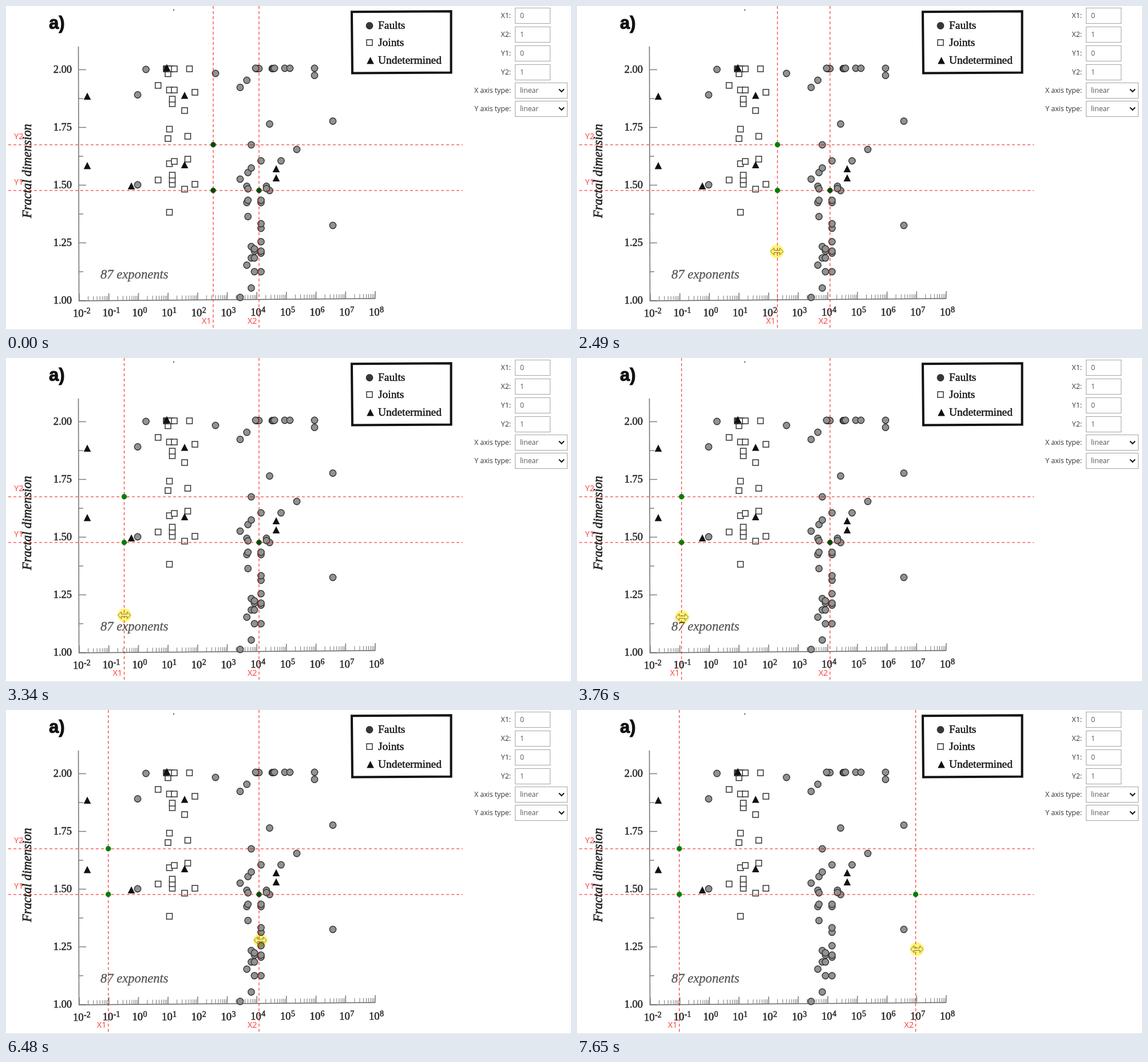
Write an HTML page with a canvas that moves like this. It is 987 px wide and 567 px high and loops after 8000 ms.

```html
<!DOCTYPE html>
<html lang="en">
<head>
<meta charset="utf-8">
<title>Axis calibration</title>
<style>
html, body { margin: 0; width: 100%; height: 100%; overflow: hidden; background: #fff; }
canvas { display: block; }
</style>
</head>
<body>
<canvas id="stage" width="987" height="567"></canvas>
<script>
const canvas = document.getElementById('stage');
const ctx = canvas.getContext('2d');
const LOOP = 8000, STEP = 69, SLACK = 10;
const SERIF = '"Liberation Serif", serif';
const SANS = '"Open Sans", sans-serif';
const Y1 = 322.8, Y2 = 242.8;

// A gesture starts, then advances in equal holds
const PRESS1 = 2230, DRAG1 = 2420, RELEASE1 = 4830, LEAVE1 = 5040, PRESS2 = 6350, DRAG2 = 6680;
const gestures = [0, 590, PRESS1, DRAG1, RELEASE1, LEAVE1, PRESS2, DRAG2];

function held(t) {
  const start = gestures.filter(s => s <= t + SLACK).pop();
  return start + Math.floor((t + SLACK - start) / STEP) * STEP;
}

// Monotone cubic curve through [time, value] keys
function curve(keys, t) {
  const last = keys.length - 1;
  if (t <= keys[0][0]) return keys[0][1];
  if (t >= keys[last][0]) return keys[last][1];
  const slope = i => (keys[i + 1][1] - keys[i][1]) / (keys[i + 1][0] - keys[i][0]);
  const tangent = i => {
    if (i === 0 || i === last) return 0;
    const a = slope(i - 1), b = slope(i);
    return a * b > 0 ? 2 * a * b / (a + b) : 0;
  };
  const i = keys.findIndex(k => k[0] > t) - 1;
  const span = keys[i + 1][0] - keys[i][0];
  const u = (t - keys[i][0]) / span, v = 1 - u;
  return v * v * (1 + 2 * u) * keys[i][1] + u * u * (3 - 2 * u) * keys[i + 1][1]
    + span * u * v * (v * tangent(i) - u * tangent(i + 1));
}

const guide1 = t => curve(
  [[2350, 362], [2489, 350.2], [3179, 217], [3317, 206.5], [3731, 182.6], [4007, 178.7]], t);
const guide2 = t => curve([[6611, 442], [7025, 510.6], [7439, 578], [7646, 591.6]], t);

// While dragging, the pointer runs slightly ahead of its guide on a straight slope
function pointerAt(t) {
  const lead = 20;
  if (t >= PRESS1 && t < LEAVE1) {
    const x = guide1(t + lead) + 1.5;
    return [x, 454 - 0.144 * (x - 180)];
  }
  if (t >= PRESS2) {
    const x = guide2(t + lead) + 2.3;
    return [x, 403 + 0.104 * (x - 444)];
  }
  if (t < PRESS1) {
    return [curve([[590, 932], [1349, 388], [1832, 363.5]], t),
      curve([[590, 547], [1349, 422], [1832, 427.5]], t)];
  }
  return [curve([[4971, 180], [5454, 393], [5868, 453], [6090, 444]], t),
    curve([[4971, 454], [5454, 378], [5868, 401], [6090, 403]], t)];
}

function path(points, close) {
  ctx.beginPath();
  for (let i = 0; i < points.length; i += 2) ctx.lineTo(points[i], points[i + 1]);
  if (close) ctx.closePath();
}

function line(x1, y1, x2, y2) {
  path([x1, y1, x2, y2]);
  ctx.stroke();
}

function disc(x, y, r) {
  ctx.beginPath();
  ctx.arc(x, y, r, 0, Math.PI * 2);
  ctx.fill();
}

function pen(color, width) {
  ctx.strokeStyle = color;
  ctx.lineWidth = width;
}

function text(str, x, y, font, color, align = 'left', bold = 0) {
  ctx.font = font;
  ctx.fillStyle = color;
  ctx.textAlign = align;
  ctx.fillText(str, x, y);
  if (bold) {
    pen(color, bold);
    ctx.strokeText(str, x, y);
  }
}

function faultMark(x, y, fill = '#929292') {
  ctx.fillStyle = fill;
  disc(x, y, 5.7);
  pen('#333', 1.4);
  ctx.stroke();
}

function jointMark(x, y) {
  ctx.fillStyle = '#fff';
  ctx.fillRect(x - 5, y - 5, 10, 10);
  pen('#333', 1.5);
  ctx.strokeRect(x - 5, y - 5, 10, 10);
}

function triangleMark(x, y) {
  ctx.fillStyle = '#111';
  path([x, y - 6.5, x + 6.3, y + 6, x - 6.3, y + 6], true);
  ctx.fill();
}

const column = (mark, x, ...ys) => ys.forEach(y => mark(x, y));
const row = (mark, y, ...xs) => xs.forEach(x => mark(x, y));

// Overlapping marks that read as one dark blot
function blot(mark, from, to, y) {
  for (let x = from; x <= to; x++) mark(x, y);
}

function drawFaults() {
  const mark = (x, y) => faultMark(x, y);
  blot(mark, 437, 442, 109.5);
  blot(mark, 465, 467, 109.5);
  row(mark, 109, 436, 469, 487, 496, 539);
  column(mark, 230, 155.5, 313);
  column(mark, 409, 142.5, 303, 510);
  column(mark, 420.7, 130, 315.5, 344, 453.5);
  column(mark, 422.7, 291.5, 320, 340, 368.5);
  column(mark, 428.5, 243, 283.5, 421, 441, 493.5);
  column(mark, 434, 429, 425, 441, 465);
  column(mark, 445.5, 271, 344, 340, 389, 381, 412.5, 432.5, 429, 465);
  column(mark, 460.5, 206.5, 323);
  column(mark, 455, 315.5, 319.5);
  column(mark, 571, 201.5, 384);
  row(mark, 271, 480.5);
  mark(244.5, 111);
  mark(366, 118);
  mark(539, 121.5);
  mark(508, 251);
}

function drawJoints() {
  const mark = jointMark;
  column(mark, 283, 118.5, 232);
  blot(mark, 280, 287, 110);
  row(mark, 110, 294, 320.5);
  column(mark, 285.5, 147, 215.5, 276, 361);
  column(mark, 290.5, 171, 163, 312, 304, 296);
  column(mark, 294, 147, 272);
  column(mark, 265.7, 139, 304.5);
  column(mark, 312, 183, 320.5);
  column(mark, 317.5, 228, 268);
  column(mark, 330, 151, 312);
}

function drawUndetermined() {
  column(triangleMark, 142, 158, 279.5);
  column(triangleMark, 312, 156.5, 278);
  column(triangleMark, 472, 285, 301);
  triangleMark(281, 108);
  triangleMark(219, 315);
}

function drawAxes() {
  pen('#777', 1.6);
  line(126.5, 71, 127.5, 516);
  for (let i = 0; i < 9; i++) {
    const y = 111 + i * 50.5;
    pen('#777', 1.4);
    line(127, y + 0.5, i % 2 ? 135 : 140, y + 0.5);
    if (i % 2 === 0) {
      text((2 - i / 8).toFixed(2), 115, y + 6, '18.5px ' + SERIF, '#222', 'right', 0.5);
    }
  }
  const baseY = x => 516 - 4 * (x - 128) / 517;
  pen('#666', 1.5);
  line(127, baseY(127), 645, baseY(645));
  for (let d = 0; d <= 10; d++) {
    const x0 = 128 + d * 51.7;
    for (let m = 1; m < (d < 10 ? 10 : 2); m++) {
      const x = x0 + 51.7 * Math.log10(m);
      pen('#777', m === 1 ? 1.5 : 1);
      line(x, baseY(x), x, baseY(x) - (m === 1 ? 13 : 8));
    }
    const y = 543.5 - d * 0.2;
    text('10', x0 - 11, y, '18.6px ' + SERIF, '#222', 'left', 0.5);
    text(String(d - 2), x0 + 8, y - 6, '14px ' + SERIF, '#222', 'left', 0.5);
  }
}

function drawLegend() {
  pen('#111', 4);
  path([604, 10.3, 777.5, 9.3, 777.5, 116.5, 605, 117.5], true);
  ctx.stroke();
  faultMark(635, 34.5, '#383838');
  jointMark(635, 64);
  triangleMark(636.5, 95.5);
  ['Faults', 'Joints', 'Undetermined'].forEach((name, i) =>
    text(name, 650, 39.8 + i * 30.5, '19.4px ' + SERIF, '#111', 'left', 0.45));
}

function drawPlot() {
  ctx.fillStyle = '#333';
  disc(293, 7, 1.1);
  text('a)', 75, 40, 'bold 31px "Liberation Sans", sans-serif', '#111', 'left', 1);
  drawAxes();
  drawLegend();
  ctx.save();
  ctx.translate(44, 371);
  ctx.rotate(-Math.PI / 2);
  text('Fractal dimension', 0, 0, 'italic 22.4px ' + SERIF, '#222', 'left', 0.6);
  ctx.restore();
  text('87 exponents', 165, 477, 'italic 22.6px ' + SERIF, '#555', 'left', 0.3);
  drawFaults();
  drawJoints();
  drawUndetermined();
}

function drawPanel() {
  const field = (label, value, y, width) => {
    text(label, 882, y + 18, '12.3px ' + SANS, '#333', 'right');
    pen('#a5a5a5', 1);
    ctx.strokeRect(889.5, y + 0.5, width, 27);
    text(value, 898, y + 18, '12.2px ' + SANS, '#555');
  };
  ['X1:', 'X2:', 'Y1:', 'Y2:'].forEach((label, i) => field(label, String(i % 2), 3 + i * 33, 61));
  ['X axis type:', 'Y axis type:'].forEach((label, i) => {
    const y = 134 + i * 32;
    field(label, 'linear', y, 91);
    pen('#111', 2);
    path([966, y + 11.5, 970.5, y + 16, 975, y + 11.5]);
    ctx.stroke();
  });
  pen('#ddd', 1);
  line(0, 566.5, 987, 566.5);
}

function drawGuides(x1, x2, t) {
  pen('rgba(255, 0, 0, 0.75)', 1.3);
  ctx.setLineDash([5, 4]);
  [Y1, Y2].forEach(y => line(4, y, 798, y));
  [x1, x2].forEach(x => line(x, 0, x, 563));
  ctx.setLineDash([]);
  const tag = (name, x, y) => text(name, x, y, '14.5px ' + SANS, '#ff3b3b');
  tag('Y2', 14, 233);
  tag('Y1', 14, 313);
  tag('X1', x1 - 20, 556);
  tag('X2', x2 - 20, 556);
  const idle = '#004d00', moved = '#008000';
  ctx.fillStyle = t < DRAG1 ? idle : moved;
  disc(x1, Y1, 4.7);
  disc(x1, Y2, 4.7);
  ctx.fillStyle = t < DRAG2 ? idle : moved;
  disc(x2, Y1, 4.7);
}

function drawPointer(x, y, resize, pressed) {
  ctx.save();
  ctx.translate(x, y);
  if (resize) {
    path([-11, 0, -5, -6, -5, -2, 5, -2, 5, -6, 11, 0, 5, 6, 5, 2, -5, 2, -5, 6], true);
  } else {
    path([0, 0, 0, 15.5, 3.6, 12.2, 6, 17.8, 8.4, 16.8, 6, 11.3, 11, 11.3], true);
  }
  ctx.fillStyle = '#fff';
  ctx.fill();
  pen(pressed ? '#666' : '#333', 0.9);
  ctx.stroke();
  if (pressed) {
    ctx.globalCompositeOperation = 'multiply';
    ctx.fillStyle = '#fff478';
    disc(0, 0, 12);
  }
  ctx.restore();
}

function draw(now) {
  const t = held(now % LOOP);
  const x1 = guide1(t), x2 = guide2(t);
  ctx.fillStyle = '#fff';
  ctx.fillRect(0, 0, canvas.width, canvas.height);
  drawPlot();
  drawPanel();
  drawGuides(x1, x2, t);
  if (t >= 590) {
    const [x, y] = pointerAt(t);
    const pressed = (t >= PRESS1 && t < RELEASE1) || t >= PRESS2;
    const near = Math.min(Math.abs(x - x1), Math.abs(x - x2)) < 6;
    const justReleased = t >= RELEASE1 && t < RELEASE1 + STEP;
    drawPointer(x, y, pressed || (near && !justReleased), pressed);
  }
}

const began = performance.now();
function frame() {
  draw(performance.now() - began);
  requestAnimationFrame(frame);
}
frame();
</script>
</body>
</html>
```
